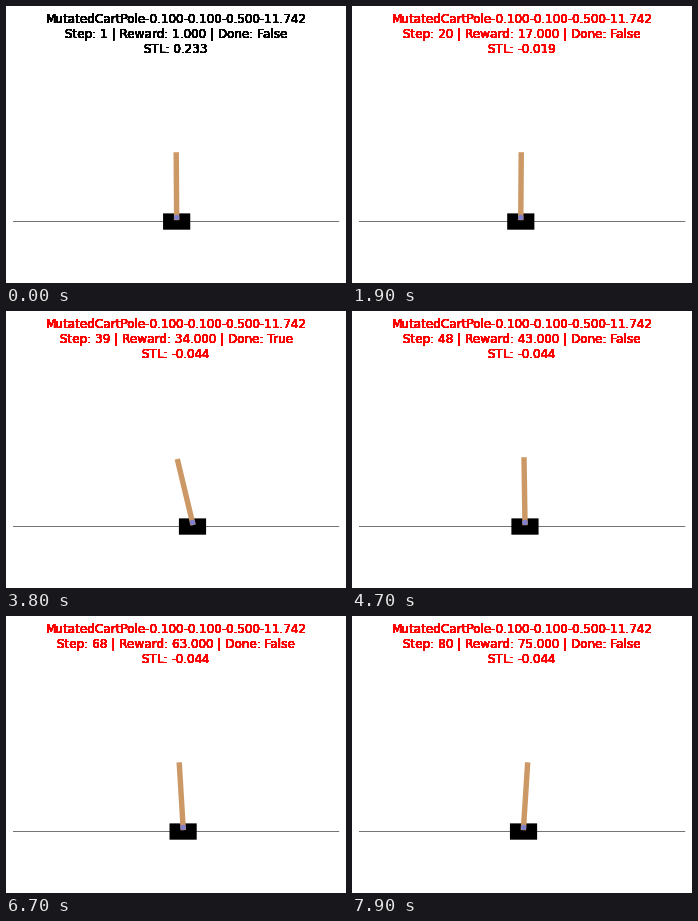
These frames come from a looping animation (340x277 px, 8 s). A matplotlib script:

```python
import numpy as np
import matplotlib.pyplot as plt
from matplotlib.animation import FuncAnimation
from matplotlib.patches import Circle, Polygon, Rectangle

W, H, DPI = 340, 277, 64
STEPS, INTERVAL = 80, 100
SCALE = 326.2 / 600            # screen pixels per simulator pixel
LEFT, FLOOR = 7, 269.9
TRACK = FLOOR - 100 * SCALE
AXLE = FLOOR - 107.5 * SCALE
POLE, POLE_W = 120 * SCALE, 10 * SCALE
CART_W, CART_H = 50 * SCALE, 30 * SCALE
FAIL_ANGLE, SAFE_ANGLE = 0.2094, 0.24
NAME = "MutatedCartPole-0.100-0.100-0.500-11.742"
COPIES = 20                    # overdrawing gives the text its hard edges

# key poses: step, pole tip x, pole angle
POSES = np.array([
    (1, 170.2, -.007), (9, 168.5, -.259), (11, 168.2, -.213), (18, 169, 0),
    (30, 170.5, .043), (35, 171, -.04), (38, 171.2, -.284), (42, 171.5, -.09),
    (48, 172, -.015), (58, 171.5, -.127), (68, 173.2, -.06), (80, 175.7, .064)])

# the cart swings beneath a slowly drifting tip
steps = np.arange(1, STEPS + 1)
key_steps, key_tips, key_angles = POSES.T
theta = np.interp(steps, key_steps, key_angles)
cart_x = np.interp(steps, key_steps, key_tips) - POLE * np.sin(theta)

# the first failing step still earns its reward, later ones do not
done = np.abs(theta) > FAIL_ANGLE
failed_before = np.cumsum(done) > 1
reward = np.cumsum(~(done & failed_before))
stl = SAFE_ANGLE - np.maximum.accumulate(np.abs(theta))

fig = plt.figure(figsize=(W / DPI, H / DPI), dpi=DPI, facecolor="white")
ax = fig.add_axes([0, 0, 1, 1])
ax.set(xlim=(0, W), ylim=(H, 0))
ax.axis("off")


def add(patch, color):
    patch.set(facecolor=color, linewidth=0, snap=False)
    return ax.add_patch(patch)


add(Rectangle((LEFT, TRACK - SCALE / 2), 600 * SCALE, SCALE), "black")
cart = add(Rectangle((0, TRACK - CART_H / 2), CART_W, CART_H), "black")
pole = add(Polygon(np.zeros((4, 2))), (.8, .6, .4))
axle = add(Circle((0, AXLE), POLE_W / 2), (.5, .5, .8))
titles = [ax.text(W / 2, 46.6, "", fontsize=12 * 72 / DPI, ha="center",
                  va="baseline", family="DejaVu Sans") for _ in range(COPIES)]


def pole_corners(x, angle):
    half = POLE_W / 2
    u = np.array([-half, -half, half, half])
    v = np.array([-half, POLE, POLE, -half])
    c, s = np.cos(angle), np.sin(angle)
    return np.column_stack([x + u * c + v * s, AXLE + u * s - v * c])


def update(i):
    x = cart_x[i]
    cart.set_x(x - CART_W / 2)
    pole.set_xy(pole_corners(x, theta[i]))
    axle.center = x, AXLE
    text = (f"{NAME}\nStep: {steps[i]} | Reward: {reward[i]:.3f} | "
            f"Done: {done[i]}\nSTL: {stl[i]:.3f}")
    for title in titles:
        title.set(text=text, color="red" if stl[i] < 0 else "black")
    return [cart, pole, axle, *titles]


anim = FuncAnimation(fig, update, frames=STEPS, interval=INTERVAL,
                     repeat=True, repeat_delay=0)
plt.show()
```
